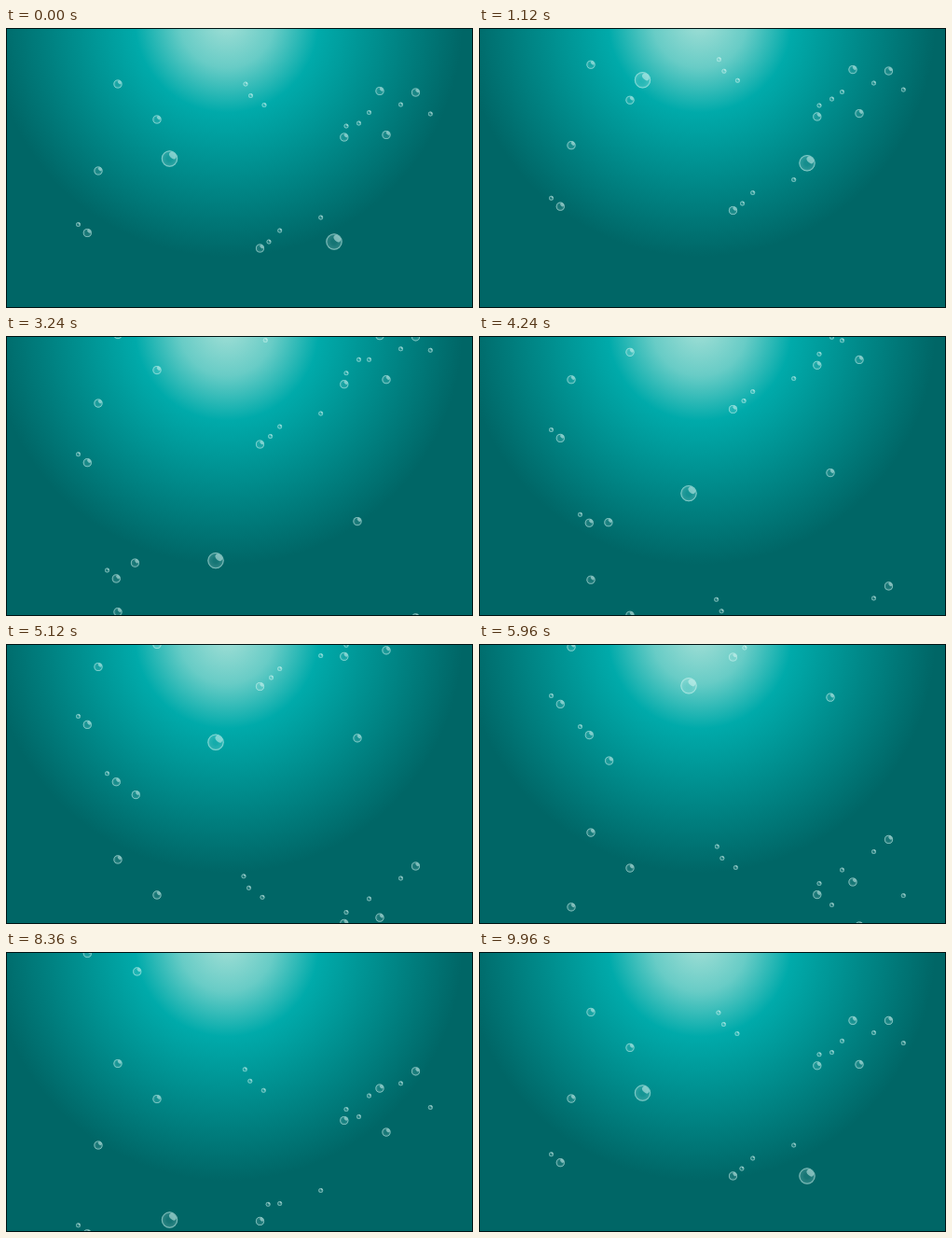
These frames come from a looping animation (501x300 px, 10 s). An HTML page with a canvas:

```html
<!DOCTYPE html>
<html lang="en">
<head>
<meta charset="utf-8">
<title>Bubbles</title>
<style>
html, body { margin: 0; width: 100%; height: 100%; overflow: hidden; background: #066; }
canvas { display: block; }
</style>
</head>
<body>
<canvas id="stage" width="501" height="300"></canvas>
<script>
const W = 501, H = 300, LOOP = 10, FRAME = .04, TAU = Math.PI * 2;
const RADIUS = { tiny: 2.5, small: 4.6, large: 8.7 };
const ctx = document.getElementById('stage').getContext('2d');

// Bubbles of a cluster leave at one speed and, late in the loop, enter again at
// another (px/s) to reach the same spots. Spots below the stage rise through once.
const clusters = [
  { out: 19.2, into: 34.4, small: [[120, 60], [162, 98]] },
  { out: 78, into: 85, large: [[175.5, 140], [352, 229]] },
  { out: 26.2, into: 47.6, tiny: [[77.5, 210.5]], small: [[87.3, 219.5]] },
  { out: 25.3, into: 31.2, small: [[99, 153]] },
  { out: 24.4, into: 38, drift: .4, tiny: [[257, 60], [262.5, 72.5], [277, 82.5]] },
  { out: 37.5, into: 30.3, tiny: [[293.7, 217], [337.7, 203]], small: [[272.5, 236]] },
  { out: 38, into: 23.9, drift: .5, tiny: [[282, 229]] },
  { out: 20.4, into: 36.7, tiny: [[365, 105], [389.5, 90.5]], small: [[362.8, 117]] },
  { out: 21.2, into: 45.4, small: [[401, 67.5], [408, 114.5]] },
  { out: 24, into: 43, tiny: [[378.5, 102], [455.3, 92]] },
  { out: 21.3, into: 34, tiny: [[423.5, 82]], small: [[439.5, 69]] },
  { out: 43.4, into: 43.4, drift: .45, small: [[137, 382]] },
  { out: 52, into: 52, small: [[377, 365]] },
  { out: 59.7, into: 59.7, tiny: [[108.5, 442]], small: [[118.3, 451]] },
  { out: 72, into: 72, large: [[225, 471]] }
];

function drawWater() {
  const g = ctx.createRadialGradient(237, -8, 0, 237, -8, 253);
  g.addColorStop(0, '#a2dfd6');
  g.addColorStop(.2, '#68ccc6');
  g.addColorStop(.39, '#00aaaa');
  g.addColorStop(1, '#006666');
  ctx.fillStyle = g;
  ctx.fillRect(0, 0, W, H);
}

function drawBubble(x, y, r) {
  if (y < -r || y > H + r) return;
  ctx.save();
  ctx.translate(x, y);
  const g = ctx.createRadialGradient(0, 0, r * .3, 0, 0, r);
  g.addColorStop(0, 'rgba(215,250,245,.1)');
  g.addColorStop(.65, 'rgba(215,250,245,.18)');
  g.addColorStop(1, 'rgba(225,255,250,.42)');
  ctx.fillStyle = g;
  ctx.beginPath();
  ctx.arc(0, 0, r, 0, TAU);
  ctx.fill();

  ctx.strokeStyle = 'rgba(210,245,240,.38)';
  ctx.beginPath();
  ctx.arc(0, 0, r - .5, 0, TAU);
  ctx.stroke();

  ctx.fillStyle = 'rgba(220,250,245,.5)';
  ctx.beginPath();
  ctx.ellipse(r * .38, -r * .38, r * .5, r * .34, Math.PI / 4, 0, TAU);
  ctx.fill();
  ctx.restore();
}

function drawCluster({ out, into, drift = 0, ...sizes }, t) {
  const leaving = Math.max(0, t - FRAME);
  const arriving = LOOP + .09 - t;
  for (const size in sizes) {
    for (const [x, y] of sizes[size]) {
      drawBubble(x + drift * leaving, y - out * leaving, RADIUS[size]);
      drawBubble(x - drift * arriving, y + into * arriving, RADIUS[size]);
    }
  }
}

function render(seconds) {
  const t = Math.floor((seconds % LOOP) / FRAME + 1e-6) * FRAME;
  drawWater();
  clusters.forEach(cluster => drawCluster(cluster, t));
  ctx.strokeStyle = '#001212';
  ctx.lineWidth = 1;
  ctx.strokeRect(.5, .5, W - 1, H - 1);
}

const start = performance.now();
function tick() {
  render((performance.now() - start) / 1000);
  requestAnimationFrame(tick);
}
tick();
</script>
</body>
</html>
```
